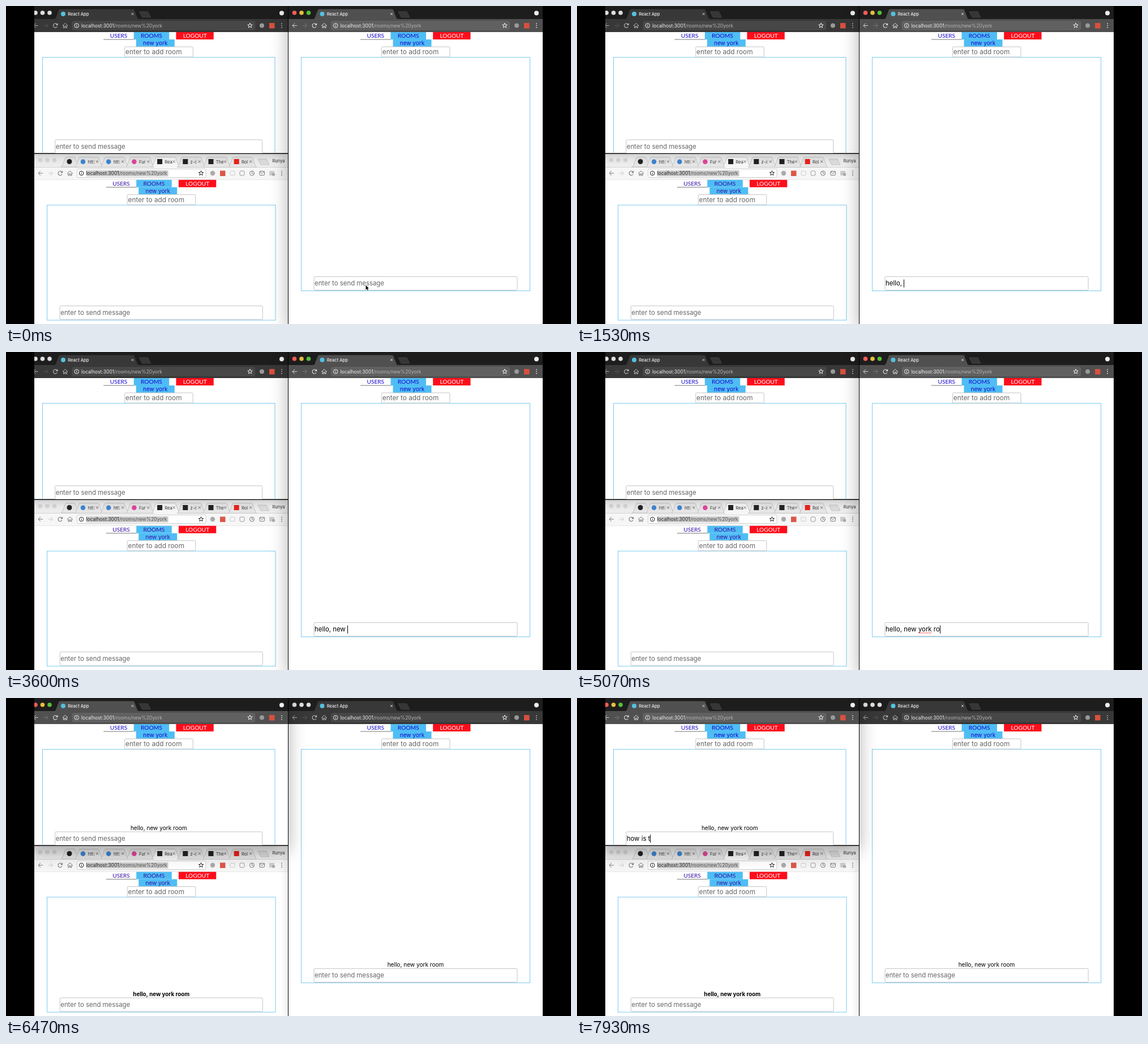
Animation, 998 px wide and 561 px high, one loop 8 s. Source, as an HTML page with a canvas:

```html
<!DOCTYPE html>
<html lang="en">
<head>
<meta charset="utf-8">
<title>Chat rooms</title>
<style>
  html, body { margin: 0; width: 100%; height: 100%; overflow: hidden; background: #000; }
  canvas { display: block; }
</style>
</head>
<body>
<canvas id="stage" width="998" height="561"></canvas>
<script>
const ctx = document.getElementById('stage').getContext('2d');
const LOOP = 8000, FOCUS_SWITCH = 6470;
const SKY = '#4fbdf4', FRAME = '#7ccbf0', MESSAGE = 'hello, new york room';

// [time, text, caret visible]
const rightTyping = [
  [0, '', false], [70, 'h', true], [200, 'he', true], [330, 'hel', true],
  [800, 'hel', false], [870, 'hell', true], [1070, 'hello', true], [1530, 'hello, ', true],
  [2070, 'hello, ', false], [2530, 'hello, ', true], [2870, 'hello, n', true],
  [2930, 'hello, ne', true], [3070, 'hello, new', true], [3600, 'hello, new ', true],
  [3930, 'hello, new y', true], [4070, 'hello, new yo', true], [4270, 'hello, new yor', true],
  [4400, 'hello, new york', true], [4470, 'hello, new york ', true],
  [4870, 'hello, new york r', true], [5070, 'hello, new york ro', true],
  [5200, 'hello, new york roo', true], [5330, MESSAGE, true],
  [5870, '', true], [FOCUS_SWITCH, '', false]
];
const leftTyping = [
  [0, '', false], [6530, 'h', true], [6930, 'ho', true], [7330, 'how', true],
  [7530, 'how ', true], [7600, 'how i', true], [7730, 'how is', true],
  [7830, 'how is ', true], [7930, 'how is t', true]
];
const stateAt = (steps, t) => steps.filter(step => step[0] <= t).pop();

const dark = {
  icon: '#d8d8d8', dim: '#777', box: '#606060', edge: '#686868',
  host: '#f0f0f0', path: '#b4b4b4', bar: '#505050'
};
const darkIdle = { ...dark, icon: '#b5b5b5', dim: '#555', bar: '#383838', box: '#474747', edge: '#4c4c4c' };
const light = {
  icon: '#777', dim: '#ccc', box: '#fff', edge: '#cfcfcf',
  host: '#222', path: '#555', bar: '#f6f6f6'
};

function rect(x, y, w, h, fill) {
  ctx.fillStyle = fill;
  ctx.fillRect(x, y, w, h);
}
function roundBox(x, y, w, h, r, fill, stroke) {
  ctx.beginPath();
  ctx.roundRect(x, y, w, h, r);
  paint(fill, stroke);
}
function dot(x, y, r, fill, stroke) {
  ctx.beginPath();
  ctx.arc(x, y, r, 0, 7);
  paint(fill, stroke);
}
function shape(points, fill, stroke, close = true) {
  ctx.beginPath();
  points.forEach(([x, y]) => ctx.lineTo(x, y));
  if (close) ctx.closePath();
  paint(fill, stroke);
}
function paint(fill, stroke, width = 1) {
  ctx.lineWidth = width;
  if (fill) { ctx.fillStyle = fill; ctx.fill(); }
  if (stroke) { ctx.strokeStyle = stroke; ctx.stroke(); }
}
function text(value, x, y, size, color, { align = 'left', family = 'Inter', weight = 400 } = {}) {
  ctx.font = `${weight} ${size}px ${family}, sans-serif`;
  ctx.textAlign = align;
  ctx.fillStyle = color;
  ctx.fillText(value, x, y);
  return ctx.measureText(value).width;
}
function cross(x, y, color) {
  shape([[x - 2, y - 2], [x + 2, y + 2]], null, color, false);
  shape([[x + 2, y - 2], [x - 2, y + 2]], null, color, false);
}
function arrow(x, y, dir, color) {
  shape([[x - 4 * dir, y], [x + 4 * dir, y]], null, color, false);
  shape([[x, y - 4], [x + 4 * dir, y], [x, y + 4]], null, color, false);
}
function reload(x, y, color) {
  ctx.beginPath();
  ctx.arc(x, y, 3.6, 0.5, 5.6);
  paint(null, color, 1.2);
  shape([[x + 4.4, y - 4.4], [x + 4.4, y - 0.4], [x + 0.4, y - 0.4]], color);
}
function home(x, y, color) {
  shape([[x - 4.5, y], [x, y - 4], [x + 4.5, y], [x + 3, y], [x + 3, y + 4],
    [x + 1, y + 4], [x + 1, y + 1], [x - 1, y + 1], [x - 1, y + 4], [x - 3, y + 4], [x - 3, y]], null, color);
}
function star(x, y, color) {
  const point = (_, i) => {
    const r = i % 2 ? 1.9 : 4.4, a = i * Math.PI / 5 - Math.PI / 2;
    return [x + r * Math.cos(a), y + r * Math.sin(a)];
  };
  shape(Array.from({ length: 10 }, point), null, color);
}
function trafficLights(left, y, colors) {
  colors.forEach((color, i) => dot(left + 10.5 + i * 12.5, y, 3.8, color));
}
function tab(x1, x2, top, bottom, fill, stroke) {
  shape([[x1, bottom], [x1 + 2, bottom - 1], [x1 + 8, top + 1], [x1 + 10, top],
    [x2 - 10, top], [x2 - 8, top + 1], [x2 - 2, bottom - 1], [x2, bottom]], fill, stroke);
}
function newTab(x, y, fill, stroke) {
  shape([[x, y - 5], [x + 15, y - 5], [x + 20, y + 5], [x + 5, y + 5]], fill, stroke);
}

function toolbar(left, right, boxRight, y, theme, selected) {
  arrow(left + 11, y, -1, theme.icon);
  arrow(left + 28.5, y, 1, theme.dim);
  reload(left + 45.7, y, theme.icon);
  home(left + 63, y, theme.icon);
  roundBox(left + 75.5, y - 7.5, boxRight - left - 75.5, 15, 2, theme.box, theme.edge);
  const infoX = left + 83.2;
  dot(infoX, y, 3.8, null, theme.host);
  rect(infoX - 0.5, y - 0.5, 1, 2.5, theme.host);
  rect(infoX - 0.5, y - 2.3, 1, 1, theme.host);
  const urlX = left + 91.5;
  if (selected) rect(urlX, y - 5, 145, 10.5, '#c9c9c9');
  const hostWidth = text('localhost:3001', urlX, y + 3, 8.5, theme.host);
  text('/rooms/new%20york', urlX + hostWidth, y + 3, 8.5, theme.path);
  star(boxRight - 8.5, y, theme.host);
  [-3.5, 0, 3.5].forEach(dy => dot(right - 11, y + dy, 0.9, theme.icon));
}

function openWindow(x, y, w, h, active) {
  ctx.save();
  ctx.shadowColor = `rgba(0,0,0,${active ? 0.32 : 0.18})`;
  ctx.shadowBlur = active ? 30 : 16;
  ctx.shadowOffsetY = active ? 10 : 4;
  rect(x, y, w, h, '#fff');
  ctx.restore();
  ctx.save();
  ctx.beginPath();
  ctx.rect(x, y, w, h);
  ctx.clip();
}

function darkBrowser(left, right, active) {
  const theme = active ? dark : darkIdle;
  rect(left, 0, right - left, 23, '#1d1d1d');
  rect(left, 23, right - left, 23, theme.bar);
  trafficLights(left, 12, active ? ['#fc5b57', '#e5bf3c', '#57c038'] : Array(3).fill('#dedede'));
  tab(left + 44, left + 193, 5.5, 23, theme.bar);
  newTab(left + 194, 15, '#363636', '#404040');
  dot(left + 59.5, 14, 4, '#53c1de');
  text('React App', left + 67.7, 17, 7.55, '#eee', { weight: 500 });
  cross(left + 182, 14, '#ccc');
  dot(right - 11, 12.5, 4, '#eee');
  toolbar(left, right, right - 58.5, 34.5, theme, false);
  dot(right - 46, 34.5, 4, '#999');
  rect(right - 33, 30, 9.5, 9.5, '#d9503f');
}

function lightBrowser() {
  rect(50, 261, 448, 23, '#ededed');
  rect(50, 284, 448, 22.5, light.bar);
  trafficLights(50, 272, Array(3).fill('#d6d6d6'));
  const tabs = [['htt|', '#3f85cf'], ['htt|', '#3f85cf'], ['Fur', '#e0459b'], ['Rea', '#222'],
    ['z-i|', '#222'], ['The', '#222'], ['Rol', '#e8221c']];
  tab(97, 130, 266.5, 284, '#e6e6e6', '#c4c4c4');
  dot(112, 274.5, 4.5, '#222');
  tabs.forEach(([title, color], i) => {
    const x = 136 + i * 45.2, current = i === 3;
    tab(x - 15, x + 36, 266.5, 284.5, current ? light.bar : '#e6e6e6', '#c4c4c4');
    if (i < 3) dot(x, 274.7, 4.3, color);
    else rect(x - 4.5, 270, 9, 9, color);
    text(title.replace('|', ''), x + 8.7, 277.5, 7.55, '#333');
    if (title.endsWith('|')) rect(x + 19, 272, 0.8, 6.5, '#999');
    cross(x + 25, 274.5, '#666');
  });
  rect(50, 284, 448, 0.7, '#c4c4c4');
  rect(262, 283.5, 40, 1.5, light.bar);
  newTab(445, 275, '#dcdcdc', '#c4c4c4');
  text('Runya', 481.5, 276, 7.6, '#333', { align: 'center' });
  toolbar(50, 498, 353, 295, light, true);
  dot(365, 295, 4.2, '#aaa');
  rect(378, 290.5, 9.5, 9.5, '#dd5747');
  roundBox(396, 291.5, 8, 7, 1, null, '#ccc');
  roundBox(413, 291, 8, 8, 2, null, '#999');
  dot(434.5, 295, 4, null, '#777');
  shape([[434.5, 292], [434.5, 295], [437, 296]], null, '#777', false);
  roundBox(448, 291.5, 8.5, 7, 1, null, '#777');
  shape([[448, 292], [452.2, 295.5], [456.5, 292]], null, '#777', false);
  rect(465, 291, 9, 8, '#ccc');
  rect(470, 295, 5, 4.5, '#aaa');
  rect(50, 306, 448, 0.6, '#ddd');
}

function inputBox(x, y, w, h) {
  roundBox(x, y, w, h, 1.5, '#fff', '#c4c4c4');
}

function page({ cx, top, half, inputHalf, inputTop, link, sent, bold, typed = '', caret, misspelt }) {
  const nav = { align: 'center', family: 'Lato' };
  rect(cx - 97.5, top + 12.5, 54, 1, '#777');
  rect(cx - 44, top, 62.5, 13, SKY);
  rect(cx + 30.7, top, 66.3, 13, '#fd0d1b');
  rect(cx - 40, top + 13, 68, 13, SKY);
  text('USERS', cx - 70.7, top + 10.2, 10.1, link, nav);
  text('ROOMS', cx - 12.8, top + 10.2, 10.3, link, nav);
  text('LOGOUT', cx + 64, top + 10.2, 10.2, '#fff', nav);
  text('new york', cx - 6, top + 23, 10, link, { align: 'center' });

  ctx.lineWidth = 1;
  ctx.strokeStyle = FRAME;
  ctx.strokeRect(cx - half, top + 44.5, half * 2, inputTop + 25.5 - top - 44.5);
  inputBox(cx - 60, top + 26, 120.5, 18);
  text('enter to add room', cx - 58.7, top + 39.3, 11.8, '#666');

  if (sent) text(MESSAGE, cx, inputTop - 3, bold ? 9.8 : 10.1, '#000', { align: 'center', weight: bold ? 700 : 400 });
  const x = cx - inputHalf + 1, baseline = inputTop + 16.2;
  inputBox(x - 1, inputTop + 0.3, inputHalf * 2, 24);
  const shown = text(typed || 'enter to send message', x, baseline, 11.4, typed ? '#000' : '#666');
  if (caret) rect(Math.round(x + (typed ? shown : 0)), inputTop + 5.5, 1, 14, '#000');
  if (misspelt) {
    const start = ctx.measureText('hello, new ').width, length = ctx.measureText('york').width;
    for (let d = 0; d < length; d += 2.4) rect(x + start + d, baseline + 1.8, 1.5, 1.2, '#f33');
  }
}

function pointer(x, y) {
  const outline = [[0, 0], [0, 8], [1.8, 6.4], [3, 9], [4.4, 8.4], [3.2, 5.8], [5.6, 5.8]]
    .map(([dx, dy]) => [x + dx, y + dy]);
  shape(outline, null, '#fff');
  shape(outline, '#000');
}

function topLeftWindow(t) {
  const active = t >= FOCUS_SWITCH, [, typed, caret] = stateAt(leftTyping, t);
  openWindow(41.5, 0, 456.5, 259.5, active);
  darkBrowser(41.5, 498, active);
  page({ cx: 269.75, top: 46, half: 205.25, inputHalf: 183, inputTop: 235.7,
    link: '#1508d0', sent: t >= 5930, typed, caret });
  ctx.restore();
}
function bottomLeftWindow(t) {
  openWindow(50, 261, 448, 300, false);
  lightBrowser();
  page({ cx: 274.25, top: 306.7, half: 201.75, inputHalf: 179, inputTop: 528.7,
    link: '#3410a8', sent: t >= 5930, bold: true });
  ctx.restore();
}
function rightWindow(t) {
  const active = t < FOCUS_SWITCH, [, typed, caret] = stateAt(rightTyping, t);
  openWindow(499, 0, 449, 561, active);
  darkBrowser(499, 948, active);
  page({ cx: 723.5, top: 46, half: 202, inputHalf: 179.5, inputTop: 477,
    link: '#1508d0', sent: t >= 5870, typed, caret, misspelt: t >= 4530 && t < 5870 });
  if (t < 70) pointer(635.5, 492.5);
  ctx.restore();
}

function draw() {
  const t = performance.now() % LOOP;
  rect(0, 0, 998, 561, '#000');
  ctx.save();
  ctx.beginPath();
  ctx.rect(50, 0, 898, 561);
  ctx.clip();
  bottomLeftWindow(t);
  const stack = [topLeftWindow, rightWindow];
  if (t >= FOCUS_SWITCH) stack.reverse();
  stack.forEach(drawWindow => drawWindow(t));
  ctx.restore();
  requestAnimationFrame(draw);
}
draw();
</script>
</body>
</html>
```
